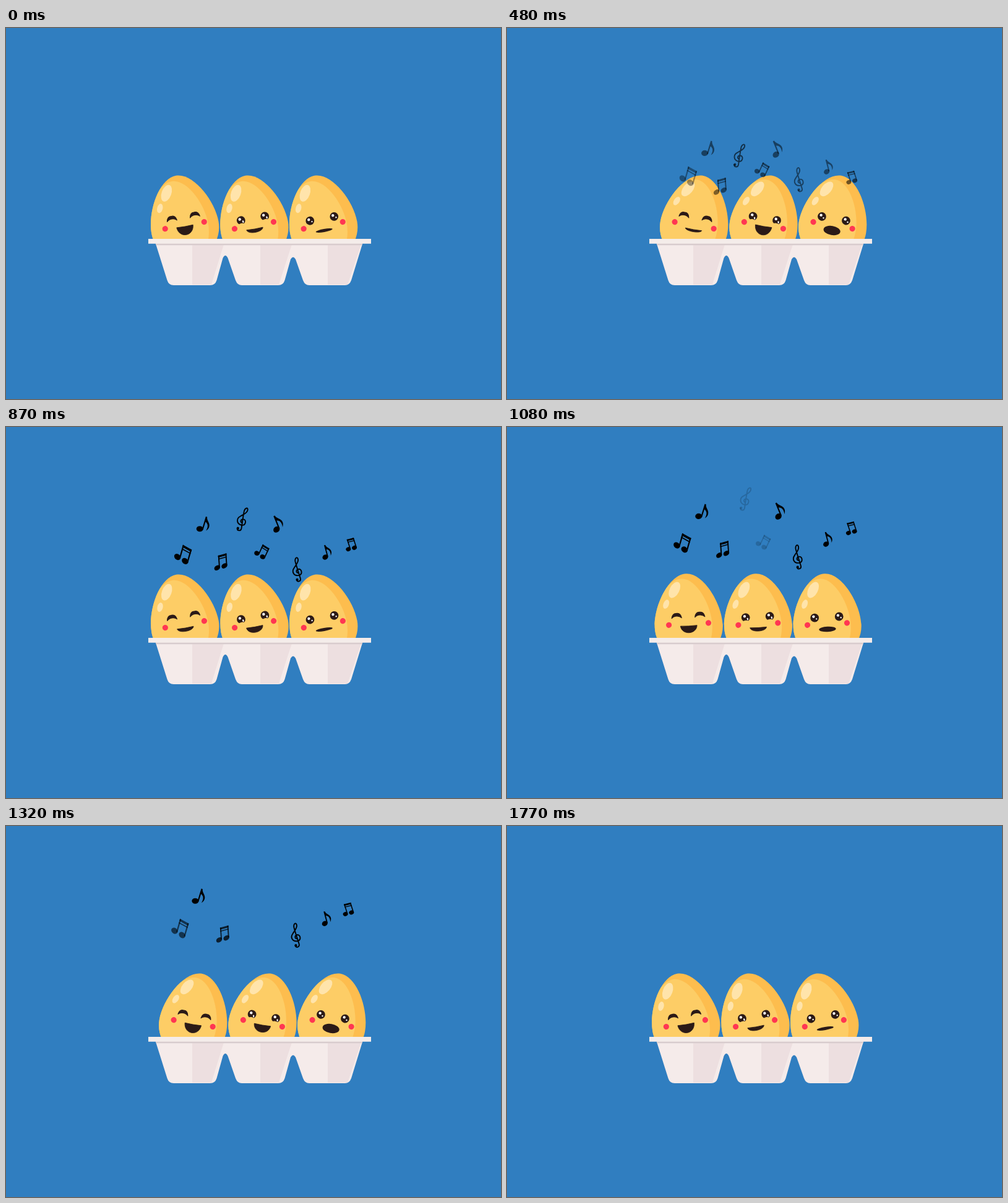
Recreate the animation shown at these times as an HTML page with a canvas. Size 800 by 600 pixels, loop 1800 ms.

```html
<!DOCTYPE html>
<html lang="en">
<head>
<meta charset="utf-8">
<title>Singing eggs</title>
<style>
html, body { margin: 0; width: 100%; height: 100%; overflow: hidden; background: #307ec0; }
canvas { display: block; }
</style>
</head>
<body>
<canvas id="stage" width="800" height="600"></canvas>
<script>
const ctx = document.getElementById('stage').getContext('2d');
const LOOP = 1800, STEP = 30;
const INK = '#2b1a17', YOLK = '#fdcd66', SHADE = '#fdbd4e', SHINE = '#ffe4ab';

const clamp = (v, a, b) => Math.min(b, Math.max(a, v));
const ramp = (t, a, b) => clamp((t - a) / (b - a), 0, 1);

// Cosine easing through [time, value] keys.
function keyed(keys, t) {
  for (let i = 1; i < keys.length; i++) {
    const [t0, v0] = keys[i - 1], [t1, v1] = keys[i];
    if (t <= t1) return v0 + (v1 - v0) * (1 - Math.cos(Math.PI * ramp(t, t0, t1))) / 2;
  }
  return keys[keys.length - 1][1];
}

function oval(x, y, rx, ry, color, tilt = 0) {
  ctx.fillStyle = color;
  ctx.beginPath();
  ctx.ellipse(x, y, rx, ry, tilt * Math.PI / 180, 0, Math.PI * 2);
  ctx.fill();
}

function shape(d, color) {
  ctx.fillStyle = color;
  ctx.fill(new Path2D(d));
}

function at(x, y, draw) {
  ctx.save();
  ctx.translate(x, y);
  draw();
  ctx.restore();
}

const EGG = new Path2D('M0-122C28-122 55-72 55-37C55-7 30 17 0 17C-30 17-55-7-55-37C-55-72-28-122 0-122Z');
const LIGHT = 'M-58-37C-57-72-34-114-8-114C16-114 38-70 38-37C38-10 24 17 0 17H-58Z';

function happyEye() {
  const p = new Path2D('M-8 3C-6.5-6-1-4.6 0-4.6C1-4.6 6.5-6 8 3C4-1.2-4-1.2-8 3Z');
  ctx.fillStyle = ctx.strokeStyle = INK;
  ctx.lineWidth = 1.2;
  ctx.lineJoin = 'round';
  ctx.fill(p);
  ctx.stroke(p);
}

function roundEye() {
  oval(0, 0, 6.9, 6.9, INK);
  oval(-1.7, -2, 2.2, 2.2, '#fff');
  oval(2.9, 1.9, 1.2, 1.2, '#fff');
}

function cheekyEye() {
  roundEye();
  oval(3.2, 3.4, 1.1, 1.1, '#fff');
  oval(0, 8.4, 6.3, 3.7, YOLK);
}

function smile(depth) {
  const top = -32 - depth / 2, low = top + depth * 4 / 3;
  const p = new Path2D(`M-13.4 ${top}Q0 ${top + 1} 13.4 ${top}C12 ${low} -12 ${low} -13.4 ${top}Z`);
  ctx.fillStyle = ctx.strokeStyle = INK;
  ctx.lineWidth = 0.8;
  ctx.lineJoin = 'round';
  ctx.fill(p);
  ctx.stroke(p);
}

const swing = t => -Math.cos(t * Math.PI * 2 / 900);

const eggs = [
  {
    x: 295.75, eye: happyEye, eyeX: 18.8, eyeY: -54,
    mouth: t => smile(keyed([[0, 14], [630, 2.5], [1290, 14]], t))
  },
  {
    x: 408, eye: cheekyEye, eyeX: 19.5, eyeY: -52,
    mouth: t => smile(keyed([[0, 6], [570, 15], [1080, 6], [1440, 14], [1800, 6]], t))
  },
  {
    x: 519.7, eye: roundEye, eyeX: 19.8, eyeY: -51.5,
    blink: t => clamp(Math.abs(t - 690) / 100, 0.07, 1),
    mouth: t => oval(0, -32, 13.7, 5 + 2.5 * swing(t), INK)
  }
];

function drawEgg(egg, t) {
  at(egg.x, 359, () => {
    ctx.rotate(swing(t) * Math.PI / 18);
    ctx.fillStyle = SHADE;
    ctx.fill(EGG);
    ctx.save();
    ctx.clip(EGG);
    shape(LIGHT, YOLK);
    ctx.restore();
    oval(-19.9, -96.7, 7.8, 14, SHINE, 30);
    oval(-34.6, -74.4, 4.5, 7.6, SHINE, 24);
    for (const side of [-1, 1]) {
      oval(side * 32, -40.5, 4.6, 4.6, '#ff3652');
      at(side * egg.eyeX, egg.eyeY, () => {
        if (egg.blink) ctx.scale(1, egg.blink(t));
        egg.eye();
      });
    }
    egg.mouth(t);
  });
}

const TRAY = 'M241 346L260.500 408Q263 416 271 416H330Q338 416 340.500 408L350.500 372' +
  'Q354.500 364 358.500 372L371 408Q374 416 381 416H440Q448 416 450.500 408L460 374' +
  'Q464 367 468 374L480 408Q483 416 490 416H548Q555 416 558 408L577 346Z';

function drawTray() {
  const tray = new Path2D(TRAY);
  ctx.save();
  ctx.clip(tray);
  ctx.fillStyle = '#f5ebea';
  ctx.fillRect(230, 345, 360, 75);
  for (const [left, right, foot] of [[301, 352, 332], [411, 462, 441], [520, 574, 552]])
    shape(`M${left} 350H${right}L${foot} 415H${left}Z`, '#eddfe0');
  ctx.fillStyle = '#d8cccd';
  ctx.fillRect(230, 348, 360, 3.3);
  ctx.restore();
  ctx.fillStyle = '#f4ecea';
  ctx.fillRect(230, 341, 360, 7.8);
}

function eighth() {
  oval(-4, 9, 5.5, 4.6, '#000', -18);
  shape('M-0.500 9V-13H1.800C2.500-7 10-5 9.600 2C9.400 5 8 7 6.500 9C8.500 1 6-3 1.600-4.500V9Z', '#000');
}

function beamed() {
  oval(-7.5, 9, 5, 4.2, '#000', -15);
  oval(5, 9, 5, 4.2, '#000', -15);
  ctx.fillStyle = '#000';
  ctx.fillRect(-4.6, -11, 2, 20);
  ctx.fillRect(7.9, -11, 2, 20);
  ctx.fillRect(-4.6, -11, 14.5, 3.4);
  ctx.fillRect(-4.6, -5.8, 14.5, 1.6);
}

function clef() {
  ctx.strokeStyle = '#000';
  ctx.lineWidth = 1.9;
  ctx.lineCap = 'round';
  ctx.stroke(new Path2D('M1 6C-3 6-3 1 1 0C7-1 8 9 1 10C-8 10-10 2-5-3C-1-8 4-11 3.500-16' +
    'C3-21-1-19-1.500-14C-1.500-10 1 5 2.500 15C3 20-3 21-4 17'));
  oval(-3, 16.4, 2.1, 2.1, '#000');
}

// x and y: [place, speed, acceleration]; show: fade in from-to, fade out from-to.
const notes = [
  { draw: eighth, x: [326, -9.8], y: [195, -58], tilt: 17, show: [360, 600, 1320, 1450] },
  { draw: clef, x: [376, 10], y: [206, -84, -6], tilt: 17, show: [330, 570, 880, 1120] },
  { draw: eighth, x: [435, 4], y: [195, -60], tilt: -22, show: [360, 600, 1100, 1300] },
  { draw: beamed, x: [294, -12.5, 3], y: [238, -50, -2], tilt: 16, slope: 0.23, size: 1.1, show: [400, 610, 1230, 1450] },
  { draw: beamed, x: [345, 4.2], y: [255, -58], tilt: -4, slope: -0.2, size: 0.95, show: [360, 600, 1260, 1500] },
  { draw: beamed, x: [413, 2], y: [228, -41, -2], tilt: 25, slope: 0.12, size: 0.87, show: [360, 600, 880, 1120] },
  { draw: clef, x: [472, -1, -0.9], y: [245, 0, -35], tilt: -9, show: [360, 600, 1560, 1750] },
  { draw: eighth, x: [518, -1], y: [224, -17, -26], tilt: -15, size: 0.87, show: [180, 820, 1430, 1620] },
  { draw: beamed, x: [556, 5, -5.5], y: [241, -82, 4], tilt: -18, slope: 0.07, size: 0.8, show: [350, 580, 1400, 1600] }
];

function drawNote(note, t) {
  const [a, b, c, d] = note.show;
  const alpha = ramp(t, a, b) * (1 - ramp(t, c, d));
  if (!alpha) return;
  const s = Math.min((t - 480) / 600, 1.78);
  const place = ([p, v, acc = 0]) => p + v * s + acc * s * s;
  const size = note.size || 1;
  at(place(note.x), place(note.y), () => {
    ctx.globalAlpha = alpha;
    ctx.rotate(note.tilt * Math.PI / 180);
    ctx.scale(size, size);
    ctx.transform(1, note.slope || 0, 0, 1, 0, 0);
    note.draw();
  });
}

function render(t) {
  ctx.fillStyle = '#307ec0';
  ctx.fillRect(0, 0, 800, 600);
  ctx.save();
  ctx.beginPath();
  ctx.rect(0, 0, 800, 345);
  ctx.clip();
  eggs.forEach(egg => drawEgg(egg, t));
  ctx.restore();
  drawTray();
  notes.forEach(note => drawNote(note, t));
}

const start = performance.now();
function tick() {
  const t = (performance.now() - start) % LOOP;
  render(Math.floor(t / STEP) * STEP);
  requestAnimationFrame(tick);
}
tick();
</script>
</body>
</html>
```
